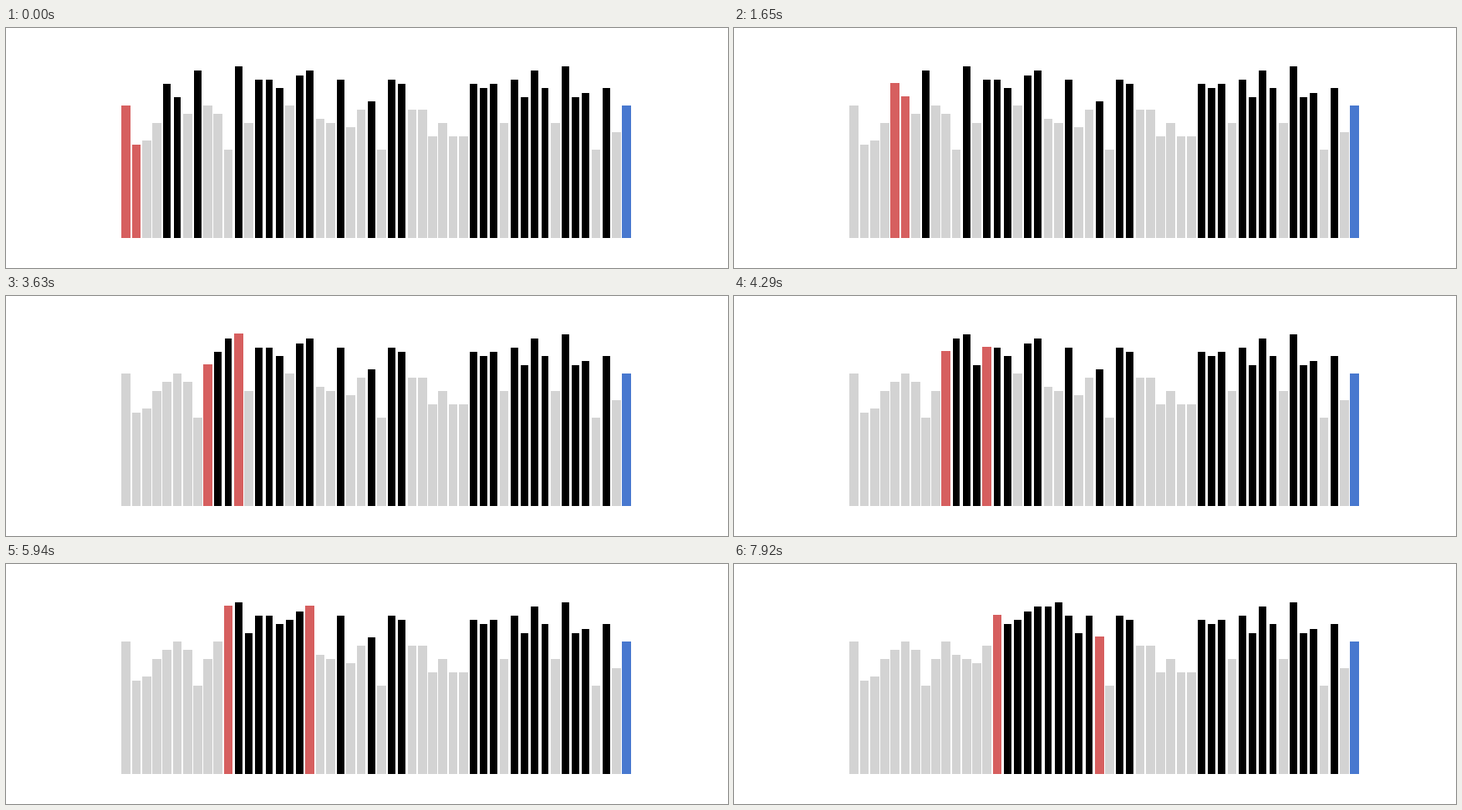
Write an HTML page with a canvas that moves like this. It is 864x288 px and loops after 8 s.

```html
<!DOCTYPE html>
<html lang="en">
<head>
<meta charset="utf-8">
<title>Quicksort partition</title>
<style>
  html, body { margin: 0; width: 100%; height: 100%; overflow: hidden; background: #fff; }
  canvas { display: block; }
</style>
</head>
<body>
<canvas id="stage" width="864" height="288"></canvas>
<script>
const LOOP = 8000, STEP = 330;
const LEFT = 138.436, SPAN = 608.727, BASE = 252, UNIT = 5.31;
const VALUES = [
  30, 21, 22, 26, 35, 32, 28, 38, 30, 28, 20, 39, 26, 36, 36, 34, 30, 37, 38, 27,
  26, 36, 25, 29, 31, 20, 36, 35, 29, 29, 23, 26, 23, 23, 35, 34, 35, 26, 36, 32,
  38, 34, 26, 39, 32, 33, 20, 34, 24, 30
];
const LAST = VALUES.length - 1;
const PIVOT = VALUES[LAST];
const PITCH = SPAN / (LAST + 0.8);
const ctx = document.getElementById("stage").getContext("2d");

// Lomuto partition, run up to and including the given scan position.
function partition(scan) {
  const bars = [...VALUES];
  let store = 0;
  for (let j = 0; j <= scan; j++) {
    if (bars[j] <= PIVOT) {
      [bars[store], bars[j]] = [bars[j], bars[store]];
      store++;
    }
  }
  return { bars, store };
}

function drawBar(index, value, color, inset) {
  const x = LEFT + index * PITCH;
  const left = Math.round(x) + inset;
  const right = Math.round(x + PITCH * 0.8) + 1 - inset;
  const top = Math.round(BASE - value * UNIT) + inset;
  ctx.fillStyle = color;
  ctx.fillRect(left, top, right - left, BASE - top);
}

function draw(time) {
  const scan = Math.floor((time % LOOP) / STEP);
  const { bars, store } = partition(scan);
  ctx.fillStyle = "#fff";
  ctx.fillRect(0, 0, 864, 288);
  bars.forEach((value, i) => {
    if (i === LAST) drawBar(i, value, "#4878cf", 0);
    else if (i === scan || i === store) drawBar(i, value, "#d65f5f", 0);
    else if (value <= PIVOT) drawBar(i, value, "#d3d3d3", 0);
    else drawBar(i, value, "#000", 1); // large bars have a white edge
  });
}

function tick() {
  draw(performance.now());
  requestAnimationFrame(tick);
}
tick();
</script>
</body>
</html>
```
